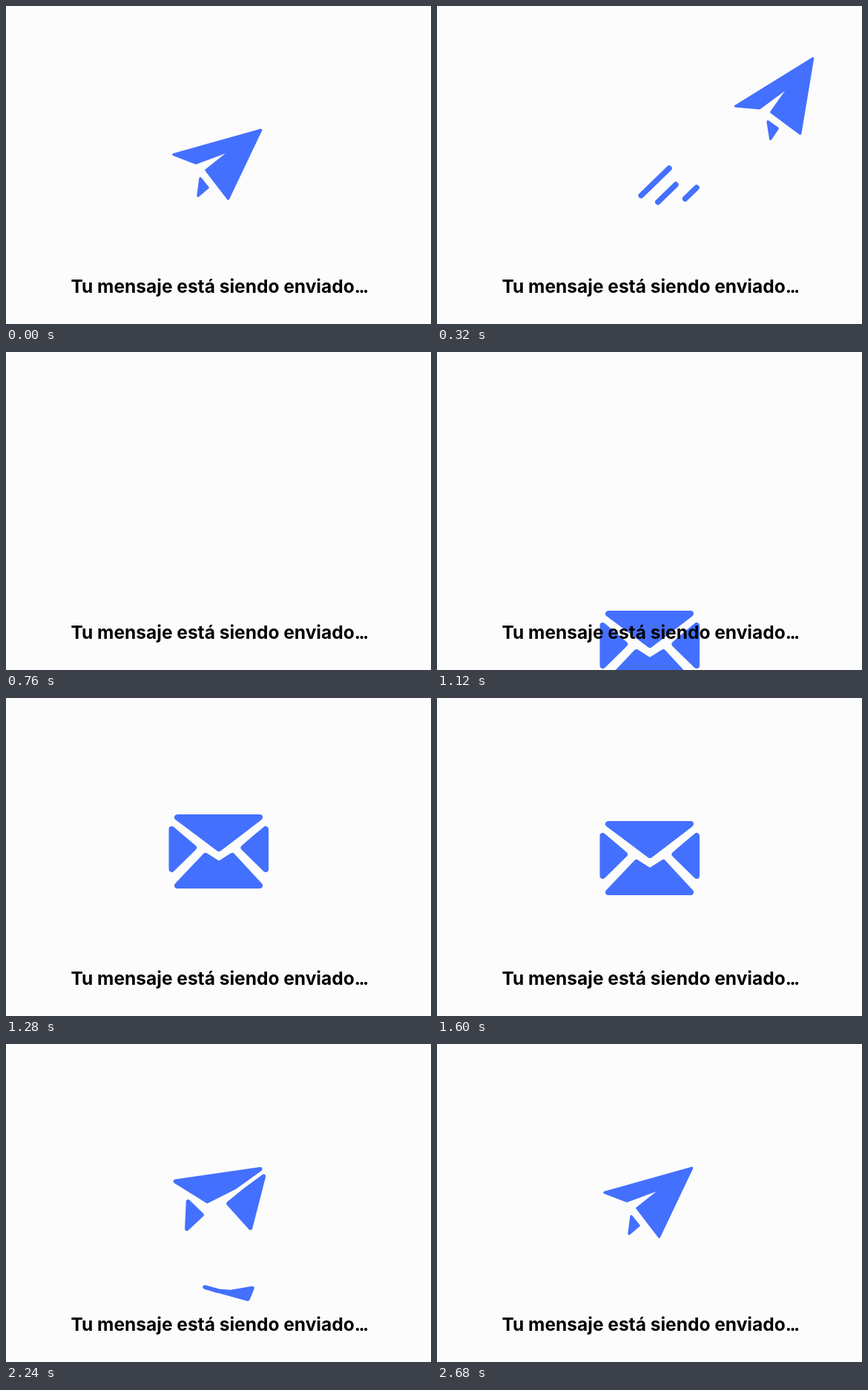
An HTML page for the animation above (2.88 s loop, 573 by 429 pixels).

```html
<!DOCTYPE html>
<html lang="es">
<head>
<meta charset="utf-8">
<title>Enviando mensaje</title>
<style>
  html, body { margin: 0; width: 100%; height: 100%; overflow: hidden; background: #fcfcfc; }
  svg { display: block; width: 100vw; height: 100vh; }
  text { font: 700 24.5px Inter, "Open Sans", sans-serif; }
  .dots { letter-spacing: -0.1em; }
  .shape { fill: #4470ff; stroke: #4470ff; stroke-linejoin: round; }
  .trail { stroke: #4470ff; stroke-width: 7.5; stroke-linecap: round; }
</style>
</head>
<body>
<svg viewBox="0 0 573 429">
  <g id="trails"></g>
  <g id="figure"></g>
  <text x="87.5" y="387">Tu mensaje está siendo enviado<tspan class="dots">...</tspan></text>
</svg>
<script>
const LOOP = 2880, STEP = 40;

// Each envelope flap folds into one part of the plane.
// pace bends its progress, push is how far it bursts outward.
const PARTS = [
  { from: "231,170 342,170 312,193 287,212", to: "226,200.5 343.5,167.5 304.5,194 256,212", pace: 1, push: [0, -4] },
  { from: "350,186 350,240 320.5,211 335,198.5", to: "343.5,167.5 299.5,260 270,221.5 304.5,194", pace: 1.3, push: [14, 0] },
  { from: "223.5,186 253,211 223.5,240", to: "262,232.5 272,245 259,256", pace: 0.8, push: [0, 0] }
];
const FLAP = { from: "231,262 269,222 287,233.5 305,222 342,262", to: "268,328 284,333 303,334.5 332,329.5 326,344" };
const TRAILS = [[313, 219], [322, 241], [350, 245]];

const clamp = v => Math.max(0, Math.min(1, v));
const span = (t, a, b) => clamp((t - a) / (b - a));
const ease = u => (1 - Math.cos(Math.PI * u)) / 2;
const mix = (a, b, u) => a + (b - a) * u;
const numbers = s => s.split(/[ ,]/).map(Number);

function morph({ from, to }, u) {
  const end = numbers(to);
  return numbers(from).map((v, i) => mix(v, end[i], u)).join(" ");
}
function add(parent, name, cls) {
  const el = document.createElementNS("http://www.w3.org/2000/svg", name);
  el.setAttribute("class", cls);
  return document.getElementById(parent).appendChild(el);
}
function set(el, attrs) {
  for (const k in attrs) el.setAttribute(k, attrs[k]);
}

const figure = document.getElementById("figure");
const flap = add("figure", "polygon", "shape");
const parts = PARTS.map(() => add("figure", "polygon", "shape"));
const trails = TRAILS.map(() => add("trails", "line", "trail"));

// The plane takes off along a curve, turning upward
function flight(t) {
  const f = t / 320;
  return `translate(${176.6 * f ** 1.5} ${-83.3 * f * f}) rotate(${-16 * f} 289.7 209.3)`;
}

// The envelope rises from below, overshoots and settles
function rise(t) {
  const y = mix(266, -30, ease(span(t, 1000, 1338))) + 30 * ease(span(t, 1338, 1560));
  return `translate(0 ${y})`;
}

function drawParts(t, flying) {
  const fold = flying ? 1 : ease(span(t, 1800, 2680));
  const burst = Math.sin(Math.PI * span(t, 1600, 2240));
  PARTS.forEach((part, n) => set(parts[n], {
    points: morph(part, fold ** part.pace),
    "stroke-width": mix(8, 3.4, fold),
    transform: `translate(${part.push.map(v => v * burst)})`
  }));
}

// The loose flap drops, then sweeps up under the plane and shrinks away
function drawFlap(t, flying) {
  const fall = span(t, 1600, 2240) ** 4;
  const sweep = ease(span(t, 2240, 2520));
  const x = 300 + 50 * Math.sin(Math.PI * sweep) - 32 * sweep;
  set(flap, {
    points: morph(FLAP, fall),
    "stroke-width": mix(8, 5.5, fall),
    transform: `translate(${x} ${335 - 88 * sweep}) rotate(${-50 * sweep}) scale(${1 - sweep}) translate(-300 -335)`,
    display: flying || sweep === 1 ? "none" : "inline"
  });
}

function drawTrails(t) {
  const head = span(t, 200, 600), tail = span(t, 320, 760) ** 2;
  TRAILS.forEach(([x, y], n) => {
    const reach = 126 * 0.64 ** n;
    set(trails[n], {
      x1: x - reach * tail, y1: y + reach * tail * 0.97,
      x2: x - reach * head, y2: y + reach * head * 0.97,
      display: t > 200 && t < 760 ? "inline" : "none"
    });
  });
}

function draw(time) {
  const t = Math.floor((time % LOOP) / STEP) * STEP;
  const flying = t < 560;
  set(figure, {
    transform: flying ? flight(t) : rise(t),
    visibility: flying || t > 1000 ? "visible" : "hidden"
  });
  drawParts(t, flying);
  drawFlap(t, flying);
  drawTrails(t);
}

const start = performance.now();
function tick() {
  draw(performance.now() - start);
  requestAnimationFrame(tick);
}
tick();
</script>
</body>
</html>
```
